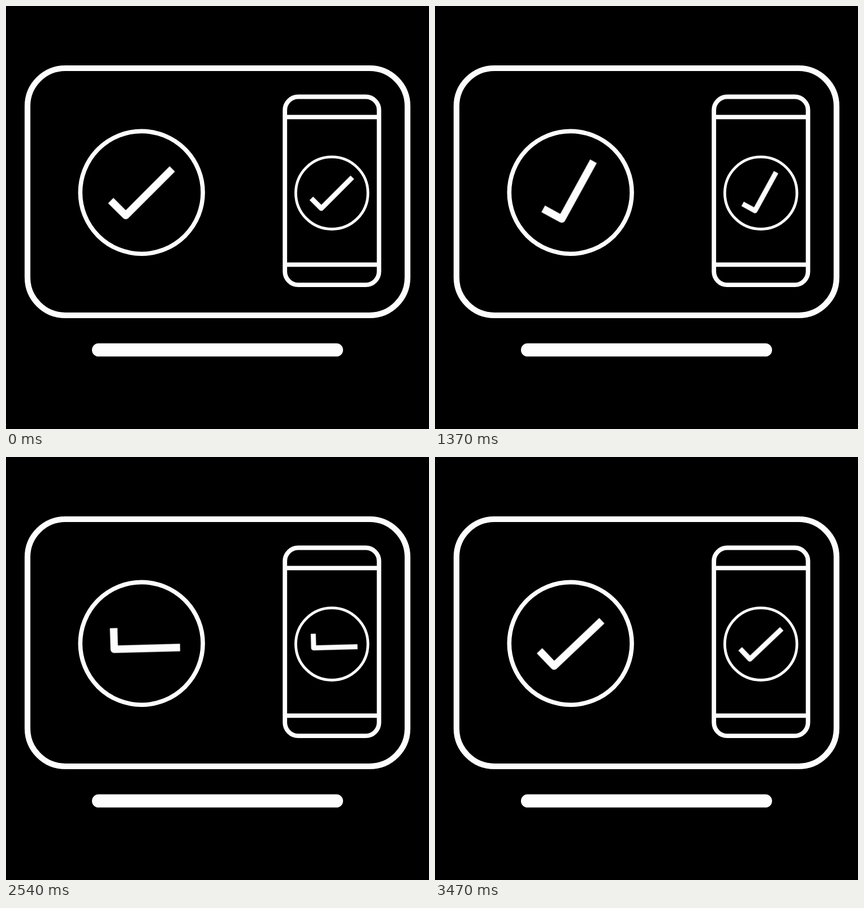
An HTML page that plays this animation: 748x748 px, repeating every 3.5 s.

```html
<!DOCTYPE html>
<html lang="en">
<head>
<meta charset="utf-8">
<title>Synced check marks</title>
<style>
  html, body { margin: 0; width: 100%; height: 100%; overflow: hidden; background: #000; }
  svg { display: block; width: 100vw; height: 100vh; }
  .tick { transform-origin: 0 0; }
</style>
</head>
<body>
<svg viewBox="0 0 748 748" fill="none" stroke="#fdfdfe">
  <defs>
    <path id="check" d="M-54.5 14.2L-28 40.6L54.3 -41.7" stroke-width="13.3" stroke-linejoin="round"/>
  </defs>

  <!-- monitor -->
  <rect x="38" y="110" width="672" height="437" rx="67" stroke-width="10.2"/>
  <rect x="152" y="596.6" width="444" height="23.2" rx="11.6" fill="#fdfdfe" stroke="none"/>
  <g transform="translate(239.7 329.8)">
    <circle r="108.4" stroke-width="7.6"/>
    <g class="tick"><use href="#check"/></g>
  </g>

  <!-- phone -->
  <g stroke-width="7.8">
    <rect x="493.2" y="160.5" width="166.4" height="332.6" rx="23.5"/>
    <path d="M493.2 196.4H659.6M493.2 457.4H659.6"/>
  </g>
  <g transform="translate(576.2 330.7)">
    <circle r="63.8" stroke-width="4.8"/>
    <g transform="scale(.667)"><g class="tick"><use href="#check"/></g></g>
  </g>
</svg>
<script>
  const FRAMES = 105, LOOP = 3500;

  // [frame, degrees]
  const swing = [[0, 0], [25, -45], [75, 45], [FRAMES, 0]];

  const keyframes = swing.map(([frame, deg], i) => {
    const next = swing[i + 1];
    return {
      offset: frame / FRAMES,
      transform: `rotate(${deg}deg)`,
      easing: next ? `steps(${next[0] - frame}, end)` : 'linear'
    };
  });

  for (const tick of document.querySelectorAll('.tick')) {
    tick.animate(keyframes, { duration: LOOP, delay: -5, iterations: Infinity });
  }
</script>
</body>
</html>
```
